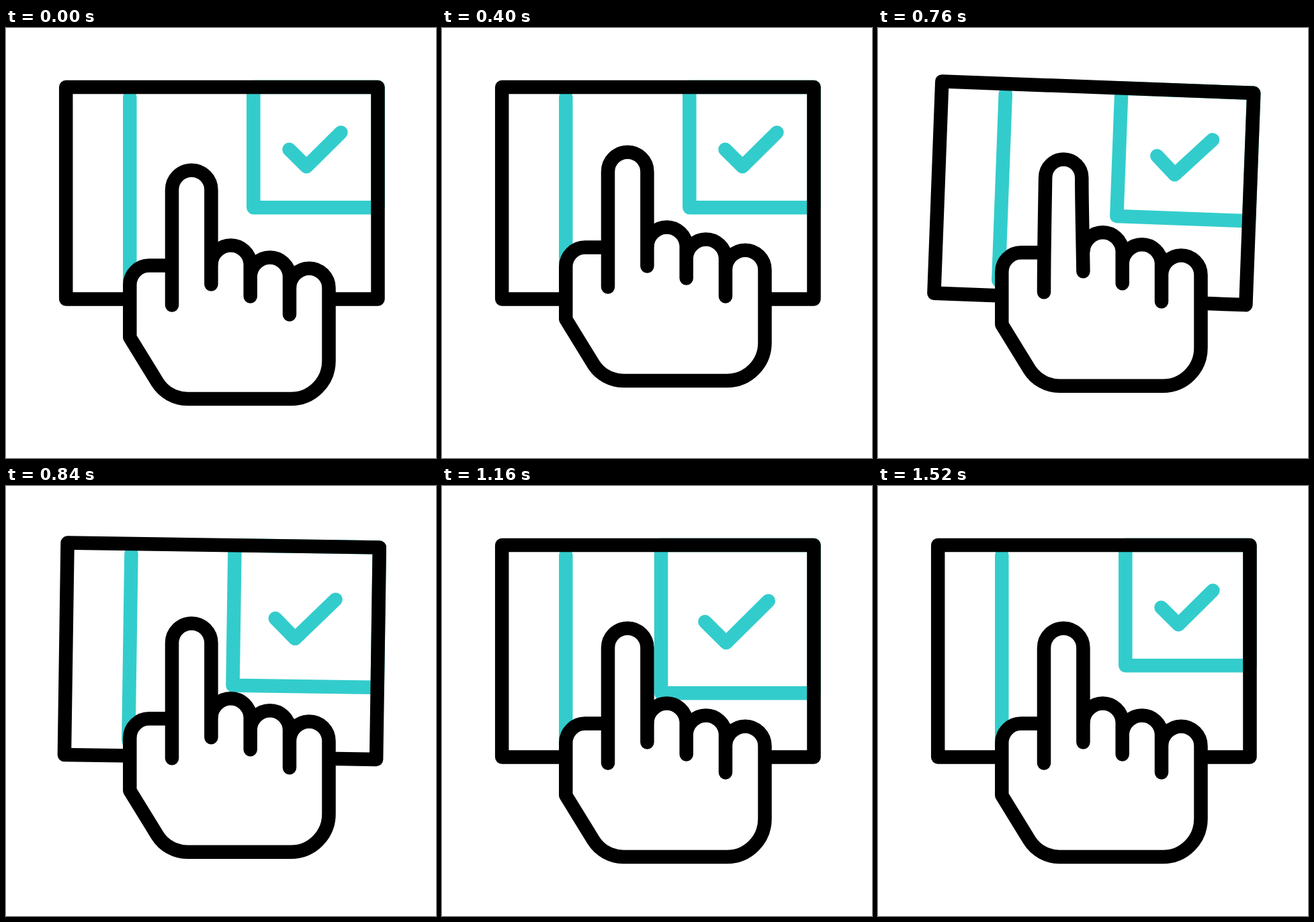
These frames come from a looping animation (640x640 px, 1760 ms). An HTML page:

```html
<!DOCTYPE html>
<html lang="en">
<head>
<meta charset="utf-8">
<title>Tap to choose</title>
<style>
  html, body { margin: 0; width: 100%; height: 100%; overflow: hidden; background: #fff; }
  svg { display: block; width: 100%; height: 100%; }
  path { fill: none; stroke: #000; stroke-width: 20.5; stroke-linecap: round; stroke-linejoin: round; }
  .accent { stroke: #33cccc; vector-effect: non-scaling-stroke; }
  #hand path { fill: #fff; }
</style>
</head>
<body>
<svg viewBox="0 0 640 640">
  <g id="sheet">
    <path class="accent" d="M184.3 103V381"/>
    <g id="choice">
      <path class="accent" d="M368.3 88H553.5V267.3H368.3Z"/>
      <path class="accent" d="M421.5 180.8L447.2 206.3L498.4 155.5"/>
    </g>
    <path d="M89.2 88H553.5V403.5H89.2Z"/>
  </g>
  <g id="hand">
    <path d="M247 353.5H213A28.7 28.7 0 0 0 184.3 382.2V460.5L225.2 527A53 53 0 0 0 270 552
      H424A56.5 56.5 0 0 0 480.5 495.5V387A29.2 29.2 0 0 0 422 387V369A29.2 29.2 0 0 0 363.7 369
      V351A29.2 29.2 0 0 0 305.4 351M363.7 399.5V369M422 426.5V387"/>
    <path id="finger"/>
  </g>
</svg>
<script>
const LOOP = 1760, STEP = 40;
const [sheet, choice, hand, finger] =
  ['sheet', 'choice', 'hand', 'finger'].map(id => document.getElementById(id));

// Smooth 0 to 1 between two times
const ease = (t, from, to) => {
  const x = Math.min(1, Math.max(0, (t - from) / (to - from)));
  return x * x * (3 - 2 * x);
};
const pulse = (t, a, b, c, d) => ease(t, a, b) - ease(t, c, d);

function fingerPath(bend) {
  const pinch = 6.2 * bend, y = 241 + 2.5 * bend, r = 29.2 - pinch;
  const left = 247 + pinch, right = 305.4 - pinch;
  return `M247 412.5C247 350 ${247 + pinch * 0.6} 300 ${left} ${y}` +
    `A${r} ${r} 0 0 1 ${right} ${y}C${right} 285 ${305.4 - pinch * 0.4} 320 305.4 381.5`;
}

function draw(now) {
  const t = Math.floor(now % LOOP / STEP) * STEP;
  const lift = 27 * pulse(t, 125, 400, 667, 929);
  const tilt = 3 * pulse(t, 567, 667, 667, 933);
  const grow = 1 + 0.228 * pulse(t, 667, 935, 1167, 1500);
  hand.setAttribute('transform', `translate(0 ${-lift})`);
  sheet.setAttribute('transform', `rotate(${tilt} 321.3 245.8)`);
  choice.setAttribute('transform', `translate(553.5 88) scale(${grow}) translate(-553.5 -88)`);
  finger.setAttribute('d', fingerPath(pulse(t, 430, 650, 667, 820)));
  requestAnimationFrame(tick);
}

const start = performance.now();
function tick() { draw(performance.now() - start); }
tick();
</script>
</body>
</html>
```
